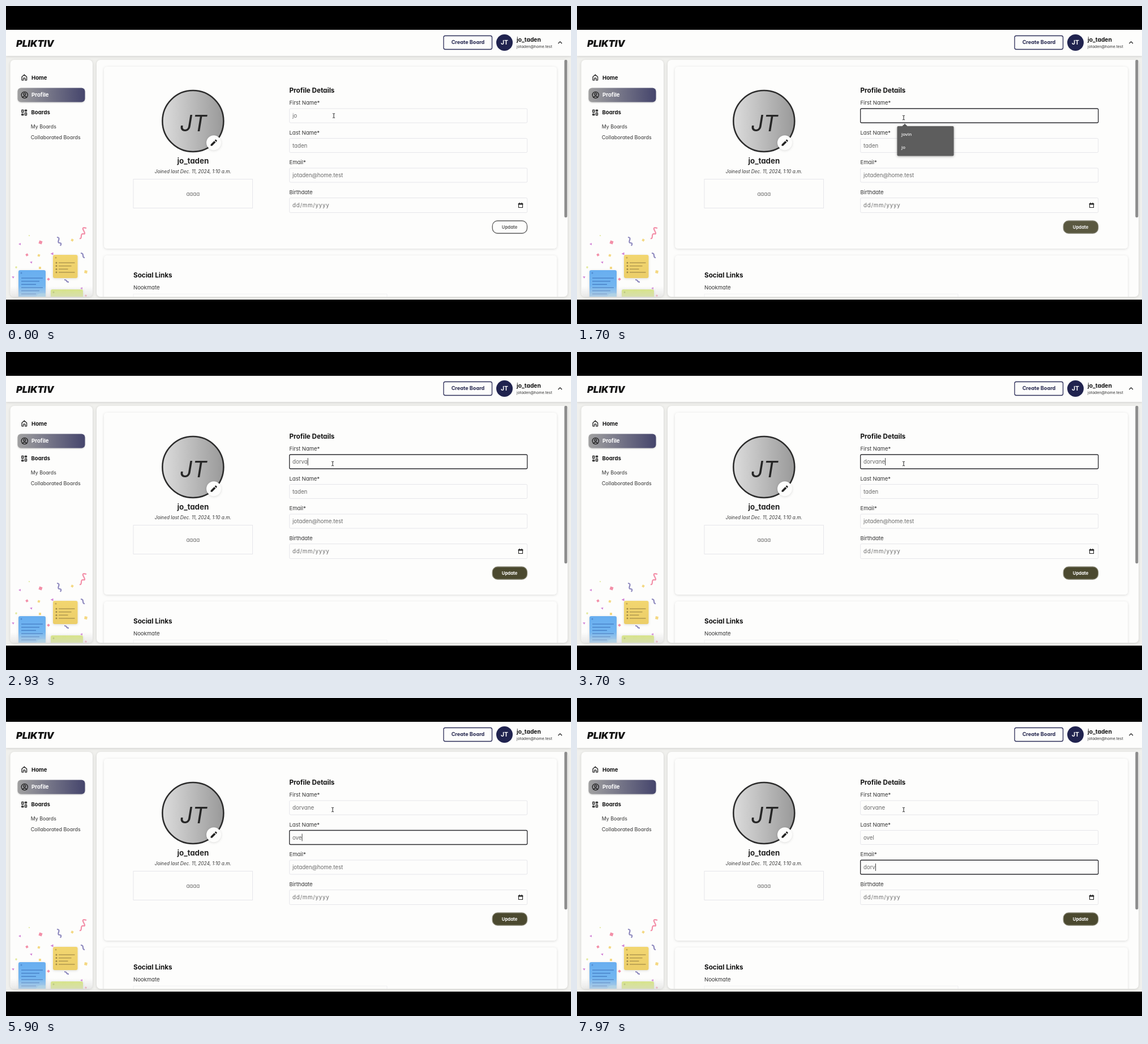
Write an HTML page that moves like this. It is 998 by 561 pixels and loops after 8000 ms.

```html
<!DOCTYPE html>
<html lang="en">
<head>
<meta charset="utf-8">
<title>Profile form</title>
<style>
  html, body { margin: 0; width: 100%; height: 100%; overflow: hidden; background: #000; }
  svg { display: block; width: 100%; height: 100%; }
  text { font: 400 9.5px Inter, sans-serif; font-feature-settings: "cv11"; fill: #333; white-space: pre; }
  .b { font-weight: 700; fill: #111; }
  .mid { text-anchor: middle; }
  .value { font-size: 9.7px; fill: #6a6a6a; }
  .card { fill: #fdfdfc; filter: drop-shadow(0 1px 2px #0002); }
  .field { fill: #fdfdfc; stroke: #e6e6ea; }
  .line { fill: none; stroke: #222; stroke-width: 1.3; stroke-linecap: round; stroke-linejoin: round; }
  .logo { font-size: 16.5px; font-weight: 900; font-style: italic; }
  .h { font-size: 11.7px; }
  .nav { font-size: 9.6px; }
  .tip { font: 600 7.9px "Open Sans", sans-serif; fill: #f4f4f4; }
</style>
</head>
<body>
<svg viewBox="0 0 998 561">
  <defs>
    <linearGradient id="pill"><stop offset="0" stop-color="#a0a0a0"/><stop offset="1" stop-color="#45456c"/></linearGradient>
    <linearGradient id="disc"><stop offset="0" stop-color="#dcdcdc"/><stop offset="1" stop-color="#999"/></linearGradient>
    <linearGradient id="blue" x2="0" y2="1"><stop offset="0" stop-color="#68aef0"/><stop offset="1" stop-color="#7cbcf0"/></linearGradient>
    <linearGradient id="yellow" x2="0" y2="1"><stop offset="0" stop-color="#f2d670"/><stop offset="1" stop-color="#ecce68"/></linearGradient>
    <linearGradient id="fade" x2="0" y2="1"><stop offset="0" stop-color="#ddd" stop-opacity="0"/><stop offset="1" stop-color="#d8d8d8" stop-opacity=".6"/></linearGradient>
    <clipPath id="side"><rect x="8" y="95" width="145" height="418" rx="7"/></clipPath>
    <clipPath id="page"><rect x="160" y="95" width="832" height="418" rx="7"/></clipPath>
  </defs>

  <rect width="998" height="561"/>
  <rect y="42" width="998" height="476" fill="#f0f0ed"/>
  <rect class="card" y="42" width="998" height="46"/>
  <rect width="998" height="42"/>

  <text class="b logo" x="18" y="72">PLIKTIV</text>
  <rect x="773" y="52.5" width="85.5" height="24" rx="3" fill="#fdfdfc" stroke="#2b2d58" stroke-width="1.3"/>
  <text class="b mid" x="816" y="67.4" style="font-size:9.1px;fill:#25274f">Create Board</text>
  <circle cx="880.5" cy="64.5" r="14.5" fill="#20234f"/>
  <text class="b mid" x="880.5" y="68.2" style="font-size:10.4px;fill:#fff">JT</text>
  <text class="b" x="902" y="63.3" style="font-size:10.2px">jo_taden</text>
  <text x="902" y="74.4" style="font-size:6.8px">jotaden@home.test</text>
  <path class="line" d="M975.8 65.8l2.9-2.9 2.9 2.9"/>

  <rect class="card" x="7.5" y="95" width="145.5" height="418" rx="7"/>
  <path class="line" d="M28 125l4.3-3.8 4.3 3.8v5.8h-2.8v-3.6h-3v3.6h-2.8z"/>
  <text class="b nav" x="45" y="129.5">Home</text>
  <rect x="20.5" y="144.5" width="119" height="25" rx="6" fill="url(#pill)" style="filter:drop-shadow(0 1px 1px #0003)"/>
  <g class="line"><circle cx="32.8" cy="157" r="5.6"/><circle cx="32.8" cy="155.3" r="1.9"/><path d="M29 161q3.8-4 7.6 0"/></g>
  <text class="b nav" x="45" y="160.2" style="fill:#fff">Profile</text>
  <path class="line" d="M27.8 183.5h3v4h-3zM33.5 183.5h3v2h-3zM27.8 190.5h3v2h-3zM33.5 188.5h3v4h-3z"/>
  <text class="b nav" x="44.5" y="191.3">Boards</text>
  <text x="43.8" y="216" style="font-size:8.8px">My Boards</text>
  <text x="43.8" y="235.3" style="font-size:9px">Collaborated Boards</text>
  <g clip-path="url(#side)"><g id="art" style="filter:blur(.4px)"></g></g>

  <rect class="card" x="160" y="95" width="832" height="418" rx="7"/>
  <g clip-path="url(#page)">
    <rect class="card" x="173" y="107" width="800" height="321" rx="5"/>
    <rect class="card" x="173" y="440" width="800" height="90" rx="5"/>
    <path d="M225 513v-5h448v5" fill="none" stroke="#f1f1f2"/>
  </g>
  <rect x="986.3" y="95" width="5" height="278" rx="2" fill="#8c8c8c"/>

  <circle cx="330.3" cy="203" r="54" fill="url(#disc)" stroke="#2c2c2c" stroke-width="2.6"/>
  <text class="mid" x="331" y="220.5" style="font-size:39px;font-style:italic;fill:#262626">JT</text>
  <circle class="card" cx="367" cy="241.3" r="13"/>
  <path d="M361.5 246.8v-2.6l6.3-6.3 2.6 2.6-6.3 6.3zM368.6 237.1l1.3-1.3q.6-.5 1.2 0l1.4 1.4q.5.6 0 1.2l-1.3 1.3z" fill="#222"/>
  <text class="b mid" x="330.3" y="278" style="font-size:13.3px;fill:#222">jo_taden</text>
  <text class="mid" x="330.3" y="294.6" style="font-size:8.25px;font-style:italic">Joined last Dec. 11, 2024, 1:10 a.m.</text>
  <rect class="field" x="225" y="305.5" width="210.5" height="51"/>
  <text class="value mid" x="330.3" y="334.6">aaaa</text>

  <text class="b h" x="500.5" y="152.5">Profile Details</text>
  <g id="form"></g>
  <g class="line" style="stroke-width:1.1;stroke-linejoin:miter"><path d="M905.5 348.5h7v7h-7zM907 347v1.5M911 347v1.5"/><path d="M905.5 349.5h7" stroke-width="2"/></g>

  <rect id="button" x="859.2" y="379" width="61.3" height="22" rx="9" stroke-width="1.3"/>
  <text id="label" class="b mid" x="889.6" y="392.6" style="font-size:7.7px">Update</text>

  <text class="b h" x="225" y="479">Social Links</text>
  <text x="225" y="500.4">Nookmate</text>

  <g id="hints">
    <path d="M574 212.5l5-5 5 5z" fill="#5d5d5d"/>
    <rect x="565.5" y="212" width="100" height="52.5" rx="2" fill="#5d5d5d" style="filter:drop-shadow(0 1px 2px #0005)"/>
    <text class="tip" x="573" y="229.3">jovin</text>
    <text class="tip" x="573" y="252">jo</text>
  </g>
  <path id="pointer" d="M-2-3.8q1.7 0 2 .8.3-.8 2-.8M0-3v6M-2 3.8q1.7 0 2-.8.3.8 2 .8" fill="none" stroke="#222"/>
</svg>

<script>
const LOOP = 8000, CLEARED = 1550, HINTS_GONE = 1900;
const $ = id => document.getElementById(id);

function add(parent, tag, attrs, text = '') {
  const el = document.createElementNS('http://www.w3.org/2000/svg', tag);
  for (const [name, value] of Object.entries(attrs)) el.setAttribute(name, value);
  el.textContent = text;
  return parent.appendChild(el);
}

// Illustration: confetti and sticky notes
const art = $('art');
const tones = { p: '#f38fa8', v: '#8f8abf', y: '#f4d882', m: '#d284d6', g: '#e2e89c' };
// x, y, half size, turn, colour
const confetti = [
  [61, 417, 2.8, 18, 'p'], [24, 420, 2, 0, 'm'], [41, 405, 1, 20, 'g'], [117, 413, 2, 30, 'y'],
  [37, 439, 2, 60, 'p'], [44, 452, 2, 15, 'm'], [58, 440, 2, 20, 'y'], [81, 437, 2.5, 0, 'm'],
  [141, 469, 2.5, 10, 'y'], [12, 478, 2, 30, 'm'], [60, 462, 2, 0, 'y'], [133, 498, 2, 0, 'm'],
  [18, 461, 1.5, 20, 'g'], [75, 482, 2, 45, 'p'], [141, 511, 1.5, 30, 'p']
];
for (const [x, y, r, turn, tone] of confetti)
  add(art, 'path', {
    d: tone === 'm' ? `M${-r} 0L${r} ${-r}V${r}z` : `M${-r} ${-r}H${r}V${r}H${-r}z`,
    fill: tones[tone], transform: `translate(${x} ${y}) rotate(${turn})`
  });
const ribbons = [
  ['M130 410q3 1 3-4t4-4 0-6 5-4', tones.p],
  ['M90 408q5 0 3 5t2 5 1 5', tones.v],
  ['M132 436q4 0 4 4t3 4', tones.v],
  ['M103 483q3 0 4 2t4 2', tones.v]
];
for (const [d, stroke] of ribbons)
  add(art, 'path', { d, stroke, fill: 'none', 'stroke-width': 2.2 });

function note(x, y, w, h, fill, ink, lines, bullets) {
  add(art, 'rect', { x, y, width: w, height: h, rx: 3, fill, style: 'filter:drop-shadow(0 1px 2px #0002)' });
  add(art, 'circle', { cx: x + 5, cy: y + 5, r: 1.5, fill: ink, opacity: .6 });
  for (let i = 0; i < lines; i++) {
    const ly = y + 14 + i * 5.6;
    if (bullets) add(art, 'circle', { cx: x + 6, cy: ly, r: 1.5, fill: ink });
    add(art, 'path', {
      d: `M${x + (bullets ? 10 : 5)} ${ly}H${x + w - 5 - (i % 3) * 6}`, stroke: ink, 'stroke-width': 1.6, opacity: .75
    });
  }
}
note(83, 439, 43.5, 41, 'url(#yellow)', '#a18a48', 4, true);
note(22, 466, 48, 52, 'url(#blue)', '#3f76be', 6, false);
note(79, 500, 57, 20, '#d6e678', '#92a142', 0, false);
add(art, 'path', { d: 'M53 513q3-8 17-6v6z', fill: '#8ccaee' });
add(art, 'rect', { x: 8, y: 494, width: 145, height: 20, fill: 'url(#fade)' });

// Form fields
const labels = ['First Name*', 'Last Name*', 'Email*', 'Birthdate'];
const initial = ['jo', 'taden', 'jotaden@home.test', 'dd/mm/yyyy'];
const fields = labels.map((label, i) => {
  const form = $('form'), y = 181 + i * 52.5;
  add(form, 'text', { x: 500.5, y: y - 7 }, label);
  const box = add(form, 'rect', { class: 'field', x: 500.7, y, width: 420, height: i === 3 ? 26 : 25, rx: 2 });
  const mark = add(form, 'rect', { x: 506, y: y + 5.5, height: 14.5, fill: '#2d63c8' });
  const value = add(form, 'text', { class: 'value', x: 506, y: y + 16 }, initial[i]);
  if (i === 3) value.style.letterSpacing = '.8px';
  const caret = add(form, 'rect', { y: y + 6, width: 1, height: 13, fill: '#444' });
  return { box, mark, value, caret };
});

// Steps: time, field, text, selected
const typed = (field, word, times) => times.map((at, i) => [at, field, word.slice(0, i + 1), false]);
const steps = [
  [900, 0, 'jo', false],
  [1250, 0, 'jo', true],
  [CLEARED, 0, '', false],
  ...typed(0, 'dorvane', [HINTS_GONE, 2050, 2190, 2400, 2700, 2950, 3240]),
  [4700, 1, 'taden', true],
  ...typed(1, 'ovel', [5500, 5680, 5850, 6030]),
  [6500, 2, initial[2], true],
  ...typed(2, 'dorv', [7350, 7510, 7680, 7850])
];

const clamp = v => Math.max(0, Math.min(1, v));
const mix = (a, b, k) => `rgb(${a.map((v, i) => Math.round(v + (b[i] - v) * k))})`;

function render(t) {
  const texts = [...initial];
  let active = [0, -1, '', false];
  for (const step of steps) {
    if (step[0] > t) break;
    active = step;
    texts[step[1]] = step[2];
  }
  const [since, focus, text, selected] = active;

  fields.forEach(({ box, mark, value, caret }, i) => {
    const on = i === focus, marked = on && selected;
    if (value.textContent !== texts[i]) value.textContent = texts[i];
    const width = text && on ? value.getComputedTextLength() : 0;
    box.style.stroke = on ? '#2a2a2e' : '';
    box.style.strokeWidth = on ? 1.3 : 1;
    value.style.fill = marked ? '#fff' : '';
    mark.setAttribute('width', marked ? width : 0);
    caret.setAttribute('x', 506 + width);
    caret.style.opacity = on && text && !selected && (t - since) % 1000 < 500 ? 1 : 0;
  });

  const lit = clamp((t - CLEARED) / 165);
  $('button').style.fill = mix([253, 253, 252], [75, 73, 47], lit);
  $('button').style.stroke = mix([92, 92, 92], [128, 127, 108], lit);
  $('label').style.fill = mix([100, 100, 100], [255, 255, 255], lit);
  $('hints').style.opacity = t < HINTS_GONE ? clamp((t - CLEARED) / 100) : 0;

  const move = clamp((t - 450) / 350), ease = move * move * (3 - 2 * move);
  $('pointer').setAttribute('transform', `translate(${579 - 2 * ease} ${193.5 + 3.5 * ease})`);
}

const start = performance.now();
function tick() {
  render((performance.now() - start) % LOOP);
  requestAnimationFrame(tick);
}
tick();
</script>
</body>
</html>
```
